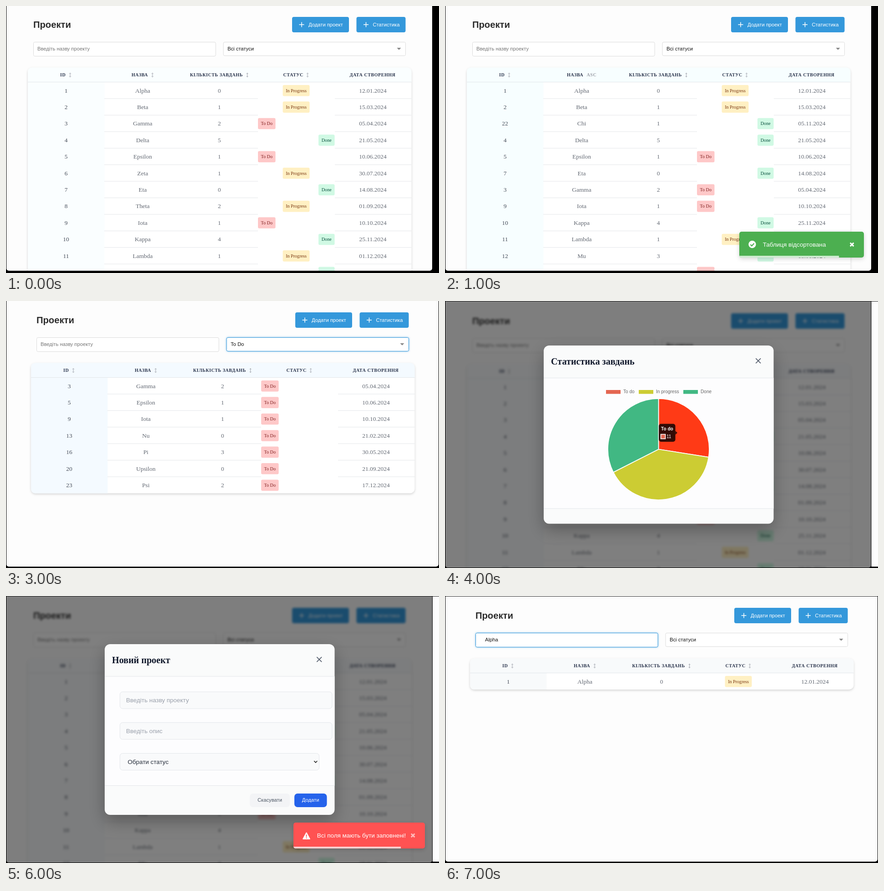
These frames come from a looping animation (952 px wide and 588 px high, 8000 ms). An HTML page:

```html
<!DOCTYPE html>
<html lang="uk">
<head>
<meta charset="utf-8">
<title>Проекти</title>
<style>
  html, body { margin: 0; width: 100%; height: 100%; overflow: hidden; background: #000; }
  svg { display: block; width: 952px; height: 588px; }
  text { white-space: pre; }
  .sans { font-family: "Liberation Sans", Arial, sans-serif; }
  .serif { font-family: "Liberation Serif", "Times New Roman", serif; }
  .mid { text-anchor: middle; }
  .bold { font-weight: bold; }
  .head { font-size: 10.1px; font-weight: bold; letter-spacing: .5px; }
  .blur { filter: blur(2.6px); }
  .focus { filter: drop-shadow(0 0 2px rgba(52, 152, 219, .6)); }
  .table { filter: drop-shadow(0 2px 2.5px rgba(0, 0, 0, .17)); }
  .toast { filter: drop-shadow(0 3px 5px rgba(0, 0, 0, .16)); }
  .modal { filter: drop-shadow(0 14px 18px rgba(0, 0, 0, .28)); }
  .scene { visibility: hidden; animation: turn 8s step-end infinite; }
  @keyframes turn { 0% { visibility: visible; } 12.5%, 100% { visibility: hidden; } }
</style>
</head>
<body>
<svg id="stage" viewBox="0 0 952 588"></svg>
<script>
// id, name, task count, status, date
const projects = `1 Alpha 0 P 12.01
2 Beta 1 P 15.03
3 Gamma 2 T 05.04
4 Delta 5 D 21.05
5 Epsilon 1 T 10.06
6 Zeta 1 P 30.07
7 Eta 0 D 14.08
8 Theta 2 P 01.09
9 Iota 1 T 10.10
10 Kappa 4 D 25.11
11 Lambda 1 P 01.12
12 Mu 3 D 18.01
13 Nu 0 T 21.02
14 Xi 4 D 06.03
16 Pi 3 T 30.05
17 Rho 3 D 15.06
18 Sigma 2 P 25.07
19 Tau 0 D 01.08
20 Upsilon 0 T 21.09
22 Chi 1 D 05.11
23 Psi 2 T 17.12
25 Zeta 0 D 30.12`.split('\n').map(line => {
  const [id, name, tasks, status, date] = line.split(' ');
  return { id: +id, name, tasks, status, date: date + '.2024' };
});
const pick = ids => ids.map(id => projects.find(p => p.id === id));
const badges = {
  T: { label: 'To Do', x: 554, w: 38.5, fill: '#fec8c8', ink: '#7f1d1d' },
  P: { label: 'In Progress', x: 608.5, w: 59, fill: '#fff0c3', ink: '#78350f' },
  D: { label: 'Done', x: 687, w: 35.5, fill: '#d0f9e4', ink: '#064e3b' }
};
const columns = [
  { key: 'id', label: 'ID', x: 119, mid: 132, icon: 141 },
  { key: 'name', label: 'НАЗВА', x: 276, mid: 300.5, icon: 322 },
  { key: 'tasks', label: 'КІЛЬКІСТЬ ЗАВДАНЬ', x: 404.5, mid: 469, icon: 530.5 },
  { key: 'status', label: 'СТАТУС', x: 609.5, icon: 663 },
  { key: 'date', label: 'ДАТА СТВОРЕННЯ', x: 755.5, mid: 806.5 }
];
const ROW = 36.42, HEAD_Y = 135.5, BODY_Y = 167.5;

const rect = (x, y, w, h, fill, r = 0, more = '') =>
  `<rect x="${x}" y="${y}" width="${w}" height="${h}" rx="${r}" fill="${fill}" ${more}/>`;
const text = (x, y, str, size, fill, cls = 'sans') =>
  `<text x="${x}" y="${y}" font-size="${size}" fill="${fill}" class="${cls}">${str}</text>`;
const line = (d, color, w = 1, more = '') =>
  `<path d="${d}" fill="none" stroke="${color}" stroke-width="${w}" ${more}/>`;
const shape = (d, fill) => `<path d="${d}" fill="${fill}"/>`;
const group = (body, attrs) => `<g ${attrs}>${body}</g>`;
const cross = (x, y, r, color, w) =>
  line(`M${x - r} ${y - r}l${2 * r} ${2 * r}m0 ${-2 * r}l${-2 * r} ${2 * r}`, color, w);

function button(x, w, label) {
  const cx = x + 21;
  return rect(x, 24, w, 34, '#3498db', 4) +
    line(`M${cx - 5.5} 41h11M${cx} 35.5v11`, '#fff', 1.5) +
    text(x + 36, 45, label, 11.22, '#fff');
}

function field(x, h, focus) {
  return rect(x, 79.5, 400.5, h, '#fff', 3,
    `stroke="${focus ? '#3498db' : '#dcdcdc'}" ${focus ? 'class="focus"' : ''}`);
}

function toolbar({ query, filter = 'Всі статуси' }) {
  return text(60, 48, 'Проекти', 20.2, '#2b2b2b', 'sans bold') +
    button(629, 125, 'Додати проект') + button(770.5, 108, 'Статистика') +
    field(60.5, 31, query) +
    (query ? text(81, 98, query, 11.22, '#111') : text(69, 98, 'Введіть назву проекту', 11.22, '#757575')) +
    field(478, 30, filter === 'To Do') + text(487, 98, filter, 11.22, '#111') +
    shape('M859.5 92h9l-4.5 4.7z', '#888');
}

function header(sort) {
  return columns.map(c => {
    const on = c.key === sort, x = on ? c.x - 8 : c.x;
    let out = text(x, 155, c.label, 10.1, '#28324a', 'serif head');
    if (on) out += text(c.icon - 10.5, 155, 'ASC', 10.1, '#9a9ea6', 'serif head');
    else if (c.icon) out += line(`M${c.icon} 147.5v9m-2 -7l2 -2l2 2m-4 5l2 2l2 -2`, '#9a9ea6', .9);
    return out;
  }).join('');
}

function row(p, i, last) {
  const y = BODY_Y + ROW * i, mid = y + 18.7;
  const b = badges[p.status];
  const cells = columns.filter(c => c.mid).map(c =>
    text(c.mid, mid + 4.3, p[c.key], 13.47, c.key === 'id' ? '#454c58' : '#636973', 'serif mid')).join('');
  return cells + rect(b.x, mid - 12.3, b.w, 24.6, b.fill, 3) +
    text(b.x + b.w / 2, mid + 3.3, b.label, 10.1, b.ink, 'serif mid') +
    (last ? '' : line(`M216 ${y + ROW}h338M723 ${y + ROW}h168.5`, '#e4e6e9'));
}

function table({ rows, tint, sort }) {
  const h = BODY_Y - HEAD_Y + ROW * rows.length;
  const tinted = `M48 ${BODY_Y}V${HEAD_Y + 10}q0 -10 10 -10H881.5q10 0 10 10V${BODY_Y}H216.5` +
    `V${HEAD_Y + h}H58q-10 0 -10 -10z`;
  return rect(48, HEAD_Y, 843.5, h, '#fff', 10, 'class="table"') + shape(tinted, tint) +
    line(`M48 ${BODY_Y}h843.5`, '#e2e6ea') + header(sort) +
    rows.map((p, i) => row(p, i, i === rows.length - 1)).join('');
}

function toast({ x, color, label, left, error }) {
  const w = 921 - x, ix = x + 28.5;
  const icon = error
    ? `<path d="M${ix} 519.5l7.3 13.5h-14.6z" fill="#fff" stroke="#fff" stroke-width="2" stroke-linejoin="round"/>` +
      line(`M${ix} 523.5v5m0 1.3v2`, color, 1.8)
    : `<circle cx="${ix}" cy="525" r="8.2" fill="#fff"/>` + line(`M${ix - 4} 525.3l3 3l5 -5.5`, color, 2.2);
  return rect(x, 497, w, 57, color, 5, 'class="toast"') + icon +
    text(ix + 23.2, 530, label, 13.47, '#fff') +
    group(cross(894.7, 525.3, 3.8, '#fff', 3), `opacity="${error ? .6 : 1}"`) +
    shape(`M${x} 550h${w * left}v4H${x + 5}q-4 0 -5 -4z`, error ? '#ffcfcf' : '#cdebcf');
}

function modal(y, h, headH, footH, title) {
  const foot = y + h - footH;
  return rect(217, y, 505.5, h, '#fafbfb', 12, 'class="modal"') +
    rect(217, y + headH, 505.5, h - headH - footH, '#fdfdfe') +
    line(`M217 ${y + headH}h505.5M217 ${foot}h505.5`, '#e3e6e9') +
    text(233, y + 42, title, 20.2, '#0f172a', 'serif bold') +
    cross(688.7, y + 33.8, 5.4, '#565f6e', 1.7);
}

function slice(from, to, fill) {
  const at = v => {
    const a = v / 40 * 2 * Math.PI;
    return `${469.5 + 111.5 * Math.sin(a)} ${326.5 - 111.5 * Math.cos(a)}`;
  };
  return `<path d="M469.5 326.5L${at(from)}A111.5 111.5 0 0 1 ${at(to)}z" fill="${fill}" stroke="#fff" stroke-width="1.7"/>`;
}

function stats() {
  const legend = [[354, 'To do', '#e46651'], [426, 'In progress', '#cccc33'], [524, 'Done', '#41b883']];
  return modal(98, 392.5, 71.5, 33.5, 'Статистика завдань') +
    legend.map(([x, label, color]) => rect(x, 196, 32, 8.5, color) + text(x + 38, 203.3, label, 10.1, '#666')).join('') +
    slice(0, 11, '#ff3a16') + slice(11, 27, '#cccc33') + slice(27, 40, '#41b883') +
    group(rect(470, 270.5, 36.5, 39.5, '#000', 5) + shape('M506.5 286l4.3 4.3l-4.3 4.3z', '#000'), 'opacity=".8"') +
    text(475, 285, 'To do', 10.1, '#fff', 'sans bold') +
    rect(474.5, 293.5, 10, 10, '#e46651', 0, 'stroke="#fff" stroke-width="1.6"') +
    text(487, 301.8, '11', 10.1, '#fff');
}

function form() {
  const box = (y, w) => rect(250.5, y, w, 37, '#f9fafb', 6, 'stroke="#e3e6ea"');
  return modal(106, 376, 71, 64.5, 'Новий проект') +
    box(211, 466.5) + text(264, 234, 'Введіть назву проекту', 13.47, '#9aa0ab') +
    box(278.7, 466.5) + text(264, 301.5, 'Введіть опис', 13.47, '#9aa0ab') +
    box(346.5, 438) + text(267.5, 369.5, 'Обрати статус', 13.47, '#252d3a') +
    line('M677.3 363.3l3.5 3.5l3.5 -3.5', '#222', 1.6) +
    rect(536, 435, 88, 30, '#f3f4f6', 7) + text(580, 453.3, 'Скасувати', 11.22, '#4b5563', 'sans mid') +
    rect(634, 435, 71.5, 30, '#2563eb', 7) + text(669.7, 453.3, 'Додати', 11.22, '#fff', 'sans mid');
}

const all = projects.slice(0, 12);
const sorted = { x: 647, color: '#4caf50', label: 'Таблиця відсортована' };
const scenes = [
  { rows: all, tint: '#fafeff', right: 937, bottom: 583 },
  { rows: pick([1, 2, 22, 4, 5, 7, 3, 9, 10, 11, 12, 13]), tint: '#f7feff', sort: 'name',
    right: 937, bottom: 583, note: { ...sorted, left: .8 } },
  { rows: pick([25, 14, 19, 17, 12, 10, 7, 4, 22, 6, 8, 18]), tint: '#f2feff', sort: 'status',
    dy: 1, right: 938, bottom: 585, note: { ...sorted, left: .72 } },
  { rows: projects.filter(p => p.status === 'T'), tint: '#f4faff', filter: 'To Do',
    dx: 7, dy: 1, right: 951, bottom: 585 },
  { rows: all, tint: '#f8fafc', dy: 3, top: 1, right: 936.5, bottom: 587, dialog: stats },
  { rows: all, tint: '#f8fafc', dy: 2, top: 1, right: 937, bottom: 587, dialog: form },
  { rows: all, tint: '#f8fafc', dy: 2, top: 1, right: 937, bottom: 587, dialog: form,
    note: { x: 632, color: '#ff5252', label: 'Всі поля мають бути заповнені!', left: .817, error: true } },
  { rows: projects.slice(0, 1), tint: '#f8fafb', query: 'Alpha', dx: 7, dy: 2, top: 1, right: 951, bottom: 585 }
];

function draw(s, i) {
  const { dx = 0, dy = 0, top = 0, right, bottom } = s;
  const frame = fill => rect(1, top - 8, right - 1, bottom - top + 8, fill, 5);
  const page = group(toolbar(s) + table(s), `transform="translate(${dx} ${dy})"`);
  let view = frame('#fdfdfd') + (s.dialog ? group(page, 'class="blur"') + frame('rgba(0,0,0,.5)') + s.dialog() : page);
  if (s.note) view += group(toast(s.note), `transform="translate(0 ${dy})"`);
  const strip = s.dialog ? rect(right + 1, 1, 951 - right, 584, '#fdfdfd') : '';
  return `<clipPath id="win${i}">${rect(0, 0, right, bottom, '#000', 5)}${rect(0, top, right, 20, '#000')}</clipPath>` +
    group(rect(0, 0, 952, 588, '#000') + strip + group(view, `clip-path="url(#win${i})"`) +
      (top ? rect(0, 0, 952, 1, '#222') : ''),
      `class="scene" style="animation-delay:${i - 8}s"`);
}
document.getElementById('stage').innerHTML = scenes.map(draw).join('');
</script>
</body>
</html>
```
